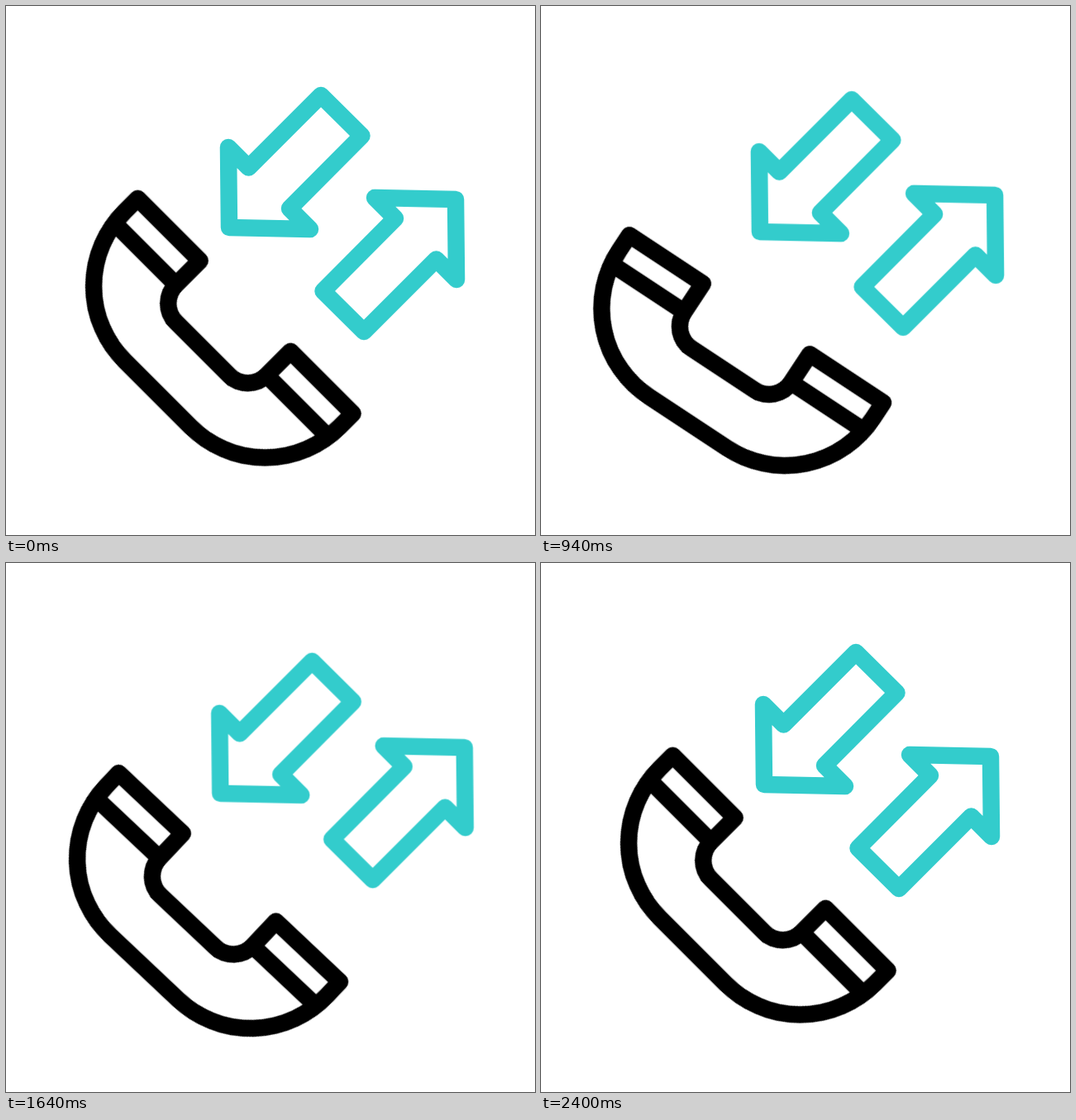
Animation, 640 px wide and 640 px high, one loop 2.42 s. Source, as an HTML page without scripts:

```html
<!DOCTYPE html>
<html lang="en">
<head>
<meta charset="utf-8">
<title>Phone call</title>
<style>
  html, body { margin: 0; height: 100%; overflow: hidden; background: #fff; }
  svg { display: block; width: 100%; height: 100%; }

  .line { fill: none; stroke-width: 20.5; stroke-linejoin: round; }
  .phone { stroke: #000; }
  .arrows { stroke: #3cc; }

  .arrow, .drift, .swing {
    animation: 2420ms cubic-bezier(.333, 0, .667, 1) infinite;
  }
  .arrow { animation-name: arrow; }
  .drift { animation-name: drift; }
  .swing { animation-name: swing; transform-origin: 256px 396.5px; }

  @keyframes arrow {
    0%, 49.59%, 99.17%, 100% { transform: translate(0, 0); }
    24.79%, 74.38% { transform: translate(-13px, 13px); }
  }
  @keyframes drift {
    0%, 99.17%, 100% { transform: translate(0, 0); }
    51.24% { transform: translate(-25.3px, 25.3px); }
  }
  @keyframes swing {
    0%, 99.17%, 100% { transform: rotate(0deg); }
    17.36%, 21.07% { transform: rotate(19.5deg); }
    34.3% { transform: rotate(-19deg); }
    50% { transform: rotate(17deg); }
    63.22% { transform: rotate(-14.9deg); }
    72.73% { transform: rotate(13deg); }
    80.58% { transform: rotate(-16.5deg); }
    88.43% { transform: rotate(7.5deg); }
    95.45% { transform: rotate(-2.2deg); }
  }
</style>
</head>
<body>
<svg viewBox="0 0 640 640">
  <defs>
    <path id="arrow" d="M270 268L269 171L293.5 195.5L381 108L430.5 157L343 245L368 270Z"/>
  </defs>

  <g class="line phone drift">
    <g class="swing">
      <!-- Handset lying flat, earpieces up, then tilted -->
      <g transform="translate(289.5 363) rotate(45)">
        <path d="M-184 0H-77.5V41a32 32 0 0 0 32 32H45.5a32 32 0 0 0 32 -32V0H184V22.5A127.5 127.5 0 0 1 56.5 150H-56.5A127.5 127.5 0 0 1 -184 22.5Z"/>
        <path d="M-182.6 41H-77.5M77.5 41H182.6"/>
      </g>
    </g>
  </g>

  <g class="line arrows">
    <use class="arrow" href="#arrow"/>
    <g transform="rotate(180 407 251)"><use class="arrow" href="#arrow"/></g>
  </g>
</svg>
</body>
</html>
```
